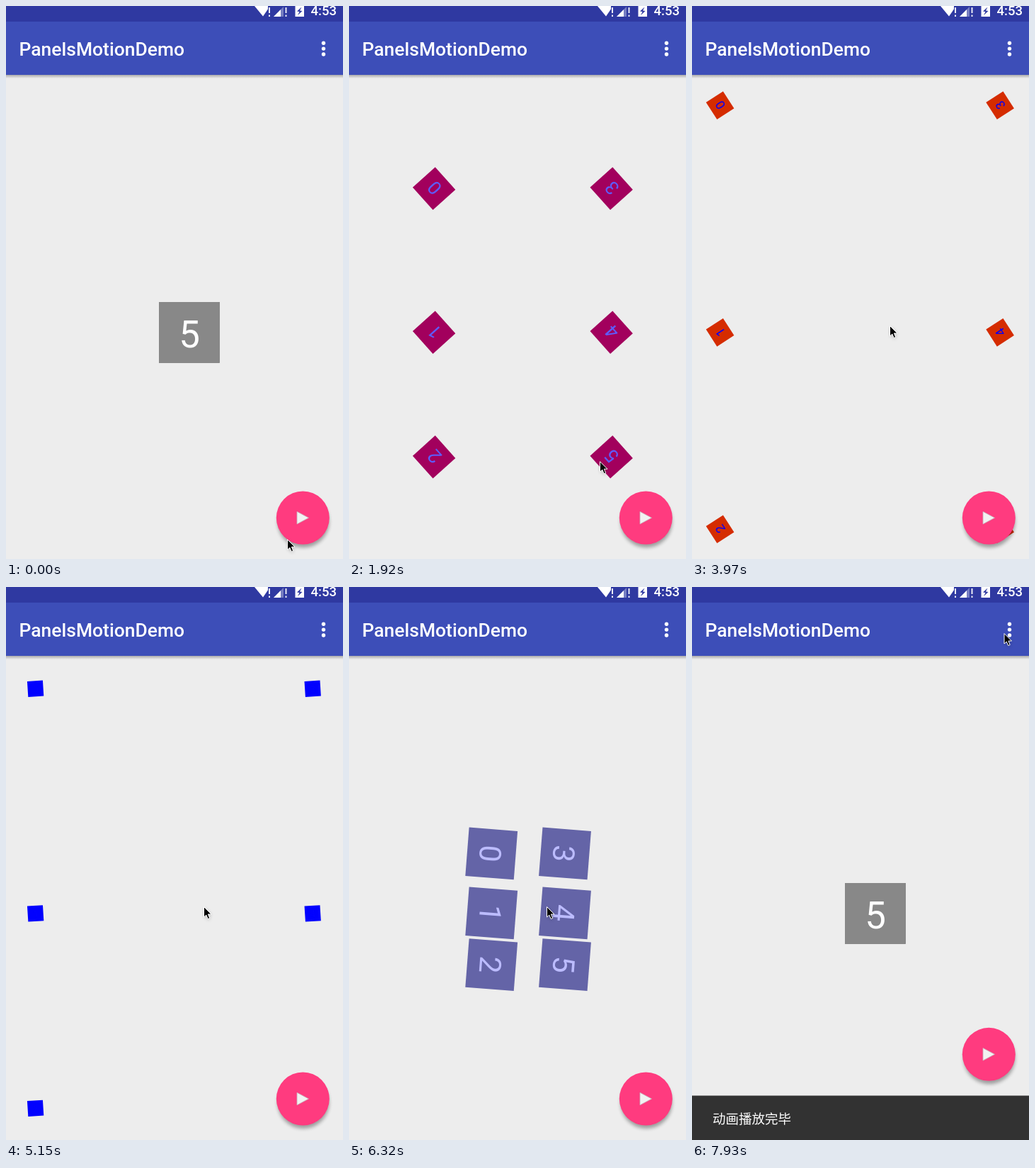
An HTML page for the animation above (8000 ms loop, 476 by 779 pixels).

```html
<!DOCTYPE html>
<html lang="en">
<head>
<meta charset="utf-8">
<title>PanelsMotionDemo</title>
<style>
  html, body { margin: 0; width: 100%; height: 100%; overflow: hidden; background: #ededed; }
  svg { display: block; width: 476px; height: 779px; font-family: Roboto, sans-serif; }
  .title { font-size: 26.45px; font-weight: 500; }
  .clock { font-size: 18.5px; font-weight: 500; }
  .digit { font-size: 52.9px; text-anchor: middle; }
  .message { font-size: 18.5px; font-family: "Noto Sans CJK SC", "Noto Sans CJK", sans-serif; }
</style>
</head>
<body>
<svg viewBox="0 0 476 779">
  <defs>
    <clipPath id="area"><rect x="18" y="118" width="439" height="641"/></clipPath>
    <linearGradient id="fade" x2="0" y2="1">
      <stop stop-color="#000" stop-opacity=".28"/>
      <stop offset="1" stop-color="#000" stop-opacity="0"/>
    </linearGradient>
    <filter id="blur" x="-30%" y="-30%" width="160%" height="160%"><feGaussianBlur stdDeviation="2.8"/></filter>
  </defs>
  <rect width="476" height="779" fill="#ededed"/>

  <rect y="97" width="476" height="5" fill="url(#fade)"/>
  <rect width="476" height="97" fill="#3d4eb8"/>
  <rect width="476" height="22" fill="#2f39a1"/>
  <g fill="#fff">
    <path d="M351 0H373L363 14.500Z"/>
    <path d="M370 0V10H374V0Z" fill="#2f39a1"/>
    <path d="M371 2h2v8h-2zM371 12.500h2v2.500h-2zM394.500 2h2v8h-2zM394.500 12.500h2v2.500h-2z" opacity=".9"/>
    <path d="M378 15L392 1V15Z" opacity=".35"/>
    <path d="M378 15L388 5V15Z"/>
    <path d="M408.500 0H421V15H408.500Z"/>
    <path d="M417.500 1.500L411 7.500L414.500 8L412 13L418.500 7L415 6.500Z" fill="#2f39a1"/>
    <text class="clock" x="430.500" y="13">4:53</text>
    <text class="title" x="18.500" y="70">PanelsMotionDemo</text>
    <circle cx="448.500" cy="52.200" r="2.700"/>
    <circle cx="448.500" cy="60.100" r="2.700"/>
    <circle cx="448.500" cy="68" r="2.700"/>
  </g>

  <g id="tiles" clip-path="url(#area)"></g>

  <g id="fab">
    <circle cx="420" cy="726.500" r="36.500" opacity=".33" filter="url(#blur)"/>
    <circle cx="419.300" cy="721" r="37.500" fill="#ff3b7f"/>
    <path d="M411 712.200L427.500 721L411 729.800Z" fill="#f2f2f2" stroke="#c4b0b8" stroke-width=".8"/>
  </g>
  <g id="snackbar">
    <rect y="716.500" width="476" height="63" fill="#323232"/>
    <text class="message" x="29" y="756" fill="#fff">动画播放完毕</text>
  </g>
  <g id="cursor">
    <path d="M1 2V16L4 13.500L6.500 19L9 18L7 12.500H11Z" opacity=".25" filter="url(#blur)"/>
    <path d="M.5 .5V15L3.800 12L6.200 17.500L8.700 16.500L6.400 11H11Z" stroke="#fff"/>
  </g>
</svg>
<script>
const LOOP = 8000, TICK = 146.8;
const HOME = { x: 259, y: 459.5 };
const COLUMNS = [39.5, 435], ROWS = [140, 459.8, 737];
const GRAY = [136, 136, 136], BLUE = [0, 0, 255], RED = [255, 0, 0];
const BLACK = [0, 0, 0], ORANGE = [213, 44, 0], WHITE = [255, 255, 255];

// Each phase runs from its first to its second value in every pair.
const PHASES = [
  { start: 340, length: 486, spread: [0, 0], scale: [1, .5], turn: 0, fill: [GRAY, BLUE], ink: [WHITE, WHITE] },
  { start: 826, length: 1860, spread: [0, 1], scale: [.5, .5], turn: 360, fill: [BLUE, RED], ink: [WHITE, BLUE] },
  { start: 2750, length: 2030, spread: [1, 1], scale: [.5, .25], turn: 360, fill: [BLACK, ORANGE], ink: [BLUE, BLUE], fillSpan: [.07, .65] },
  { start: 5024, length: 1980, spread: [1, 0], scale: [.25, 1], turn: -360, fill: [BLUE, GRAY], ink: [BLUE, WHITE] }
];

const CURSOR = [
  [0, 397, 751], [1575, 397, 751], [2510, 279, 450],
  [7300, 279, 450], [7800, 440.5, 65], [8000, 440.5, 65]
];

const $ = id => document.getElementById(id);
const clamp = v => Math.min(1, Math.max(0, v));
const lerp = ([a, b], q) => a + (b - a) * q;
const ease = v => .5 - Math.cos(Math.PI * clamp(v)) / 2;
const mix = ([a, b], q) => `rgb(${a.map((v, i) => Math.round(lerp([v, b[i]], q)))})`;
const move = (node, x, y) => node.setAttribute('transform', `translate(${x} ${y})`);

const tiles = Array.from({ length: 6 }, (_, i) => {
  const node = document.createElementNS('http://www.w3.org/2000/svg', 'g');
  node.innerHTML = `<rect x="-43" y="-42.5" width="85.5" height="85.5"/><text class="digit" y="21">${i}</text>`;
  $('tiles').append(node);
  return { node, x: COLUMNS[Math.floor(i / 3)], y: ROWS[i % 3] };
});

function drawTiles(t) {
  const phase = PHASES.findLast(p => t >= p.start) || PHASES[0];
  const q = ease((t - phase.start) / phase.length);
  const [from, to] = phase.fillSpan || [0, 1];
  const fill = mix(phase.fill, clamp((q - from) / (to - from)));
  const ink = mix(phase.ink, q);
  const spread = lerp(phase.spread, q), scale = lerp(phase.scale, q);
  for (const { node, x, y } of tiles) {
    const px = lerp([HOME.x, x], spread), py = lerp([HOME.y, y], spread);
    node.setAttribute('transform', `translate(${px} ${py}) rotate(${phase.turn * q}) scale(${scale})`);
    node.firstChild.setAttribute('fill', fill);
    node.lastChild.setAttribute('fill', ink);
  }
}

function drawCursor(t) {
  const i = CURSOR.findLastIndex(k => t >= k[0]);
  const a = CURSOR[i], b = CURSOR[Math.min(i + 1, CURSOR.length - 1)];
  const q = b === a ? 0 : (t - a[0]) / (b[0] - a[0]);
  move($('cursor'), lerp([a[1], b[1]], q), lerp([a[2], b[2]], q));
}

function draw(time) {
  // The picture advances in even ticks rather than continuously.
  const t = Math.floor((time % LOOP) / TICK) * 147 + 5;
  const rise = 1 - (1 - clamp((t - 7070) / 260)) ** 3;
  drawTiles(t);
  drawCursor(t);
  move($('fab'), 0, -62.7 * rise);
  move($('snackbar'), 0, 63 * (1 - rise));
}

const begin = performance.now();
function frame() {
  draw(performance.now() - begin);
  requestAnimationFrame(frame);
}
frame();
</script>
</body>
</html>
```
